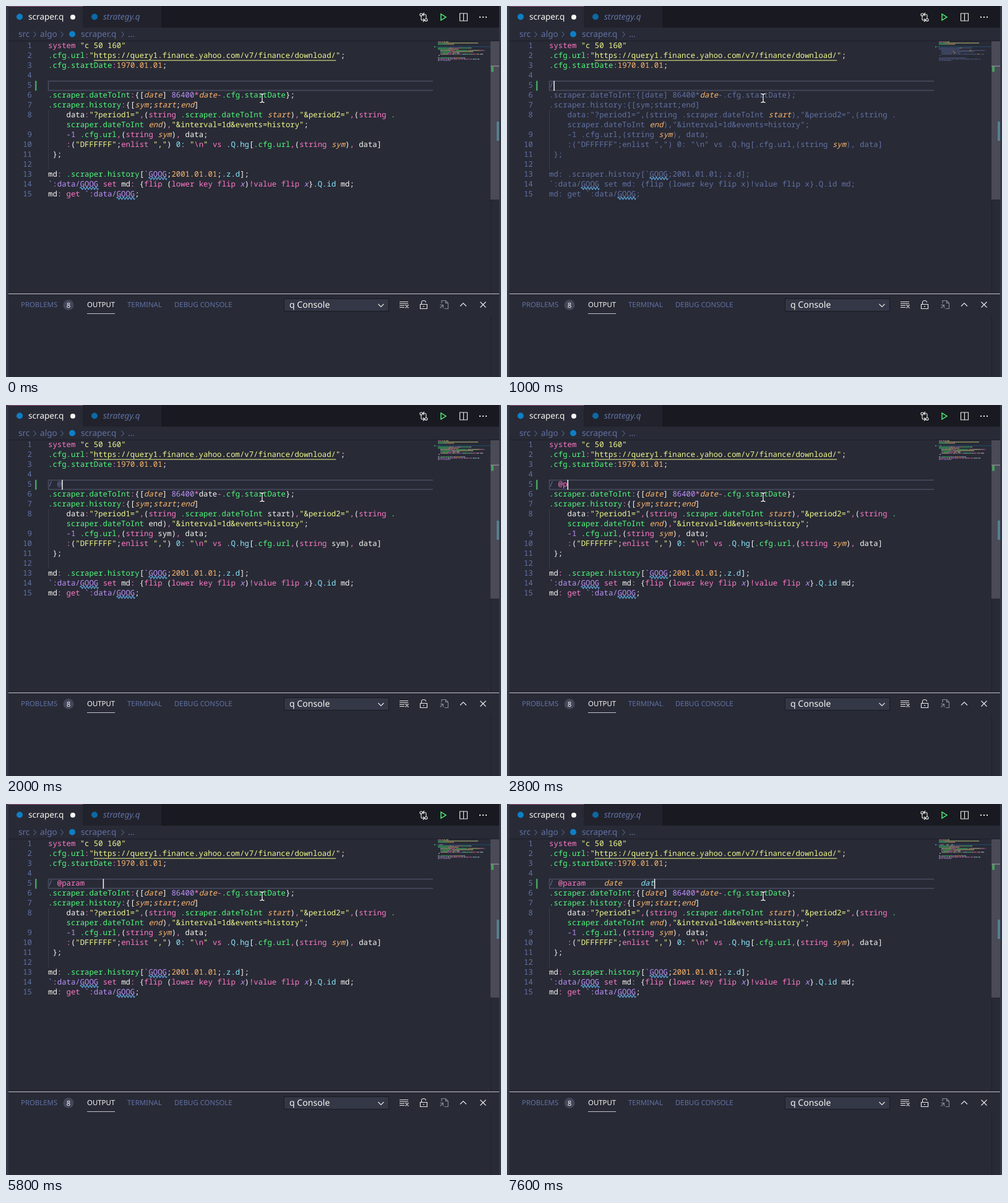
An HTML page for the animation above (8000 ms loop, 800 by 600 pixels).

```html
<!DOCTYPE html>
<html lang="en">
<head>
<meta charset="utf-8">
<title>Editor typing</title>
<style>
html, body { margin: 0; width: 100%; height: 100%; overflow: hidden; background: #282a36; }
svg { display: block; width: 800px; height: 600px; }
text { white-space: pre; text-rendering: geometricPrecision; fill: #f8f8f2; }
.ui text { font: 13.6px "Noto Sans", "Open Sans", sans-serif; }
.code text { font: 500 12.31px "Noto Sans Mono", "DejaVu Sans Mono", monospace; font-variant-ligatures: none; }
.ui .dim, .code .dim { fill: #6272a4; }
.code .dim { font-weight: 400; }
.ui .small { font-size: 11.4px; }
.ui .preview { font-style: italic; }
.icon { fill: none; stroke: #e8e8e6; stroke-width: 1.15; }
</style>
</head>
<body>
<svg viewBox="0 0 800 600">
  <defs>
    <path id="ibeam" d="M410.5 142q3 0 3.500 1.500q.5-1.500 3.500-1.500M414 143v12M410.500 156q3 0 3.500-1.500q.5 1.500 3.500 1.500" fill="none"/>
  </defs>
  <rect width="800" height="600" fill="#282a36"/>
  <g class="ui">
    <!-- tabs and breadcrumbs -->
    <rect width="800" height="35" fill="#191a21"/>
    <rect x="4" width="120.5" height="35" fill="#282a36"/>
    <rect x="4" width="120.5" height="1" fill="#94527e"/>
    <rect x="125" width="126" height="35" fill="#21222c"/>
    <circle cx="22" cy="17.5" r="5" fill="#0d7fc6"/>
    <text x="36" y="22">scraper.q</text>
    <circle cx="108" cy="18" r="4" fill="#f8f8f2"/>
    <circle cx="143" cy="17.5" r="5" fill="#0d69a3"/>
    <text x="157" y="22" class="dim preview">strategy.q</text>
    <text x="20" y="50" class="dim">src</text>
    <text x="55" y="50" class="dim">algo</text>
    <circle cx="107" cy="45.5" r="5" fill="#0d7fc6"/>
    <text x="121" y="50" class="dim">scraper.q</text>
    <text x="197" y="50" class="dim">…</text>
    <path d="M44.5 41.5l4 4.5-4 4.5M88.5 41.5l4 4.5-4 4.5M186.5 41.5l4 4.5-4 4.5" fill="none" stroke="#6272a4"/>
    <rect x="4" y="56" width="793" height="1" fill="#1d1e27"/>
    <g class="icon">
      <circle cx="671" cy="14" r="2"/><circle cx="679" cy="22.5" r="2"/>
      <path d="M671 16v5q0 2 2 2h3M674 20.5l2.5 2.5-2.5 2.5M679 20.5v-5q0-2-2-2h-3M676 11l-2.5 2.5 2.5 2.5"/>
      <path d="M703 13v10l8-5z" stroke="#50fa7b" stroke-width="1.4"/>
      <path d="M733.5 12h12v12h-12zM739.5 12v12"/>
      <path d="M765 18h2M770 18h2M775 18h2" stroke-width="2"/>
    </g>

    <!-- panel -->
    <rect x="4" y="465" width="793" height="1" fill="#c4c4c8"/>
    <text x="24" y="487" class="dim small">PROBLEMS</text>
    <circle cx="101" cy="483.5" r="8.5" fill="#44475a"/>
    <text x="101" y="487.5" class="small" text-anchor="middle">8</text>
    <text x="131" y="487" class="small">OUTPUT</text>
    <rect x="131" y="497" width="45" height="1" fill="#c4c4c8"/>
    <text x="196" y="487" class="dim small">TERMINAL</text>
    <text x="272" y="487" class="dim small">DEBUG CONSOLE</text>
    <rect x="449.5" y="473.5" width="169" height="20" fill="#343746" stroke="#191a21"/>
    <text x="458" y="488" style="font-size:14.1px">q Console</text>
    <g class="icon">
      <path d="M601.5 482l4.5 4.5 4.5-4.5"/>
      <path d="M636 478.5h14M636 481.5h14M636 484.5h8M636 487.5h8M645.5 483.5l5 5M650.5 483.5l-5 5"/>
      <path d="M669.5 482.5h11v7h-11zM671.5 482.5v-3q0-3 3.5-3t3.5 3M675 485v2"/>
      <path d="M704 481v-4.5h6.5l4 4v9h-6M710.5 476.5v4h4M701.5 483.5h5v5M706 484l-4.5 4.5" stroke="#8a8b92"/>
      <path d="M734 485.5l5-5 5 5M766.5 478.5l9 9M775.5 478.5l-9 9"/>
    </g>
    <rect x="783" y="501" width="1" height="99" fill="#20212b"/>
  </g>

  <!-- scrollbar and overview marks -->
  <rect x="783" y="57" width="1" height="408" fill="#20212b"/>
  <rect x="783" y="57" width="14" height="256" fill="#4a4b57"/>
  <rect x="783" y="96.5" width="14" height="1.5" fill="#85868c"/>
  <rect x="784" y="98" width="4" height="8.5" fill="#469d5e"/>
  <rect x="793" y="187" width="4" height="31" fill="#56808f"/>

  <!-- editor fixtures -->
  <path d="M690 121.500H68.500V136.500H690" fill="none" stroke="#4a4d61" stroke-width="1.5"/>
  <rect x="47" y="121" width="2.5" height="16" fill="#44a25d"/>
  <rect x="68" y="168" width="1" height="96" fill="#3a3c49"/>
  <rect x="692" y="65" width="91" height="1.5" fill="#20435c"/>
  <rect x="692" y="65" width="1.8" height="2" fill="#3f9858"/>
  <g class="code" id="numbers"></g>
  <g class="code" id="code"></g>
  <g id="map" opacity=".6"></g>
  <g id="marks" fill="none" stroke="#62aee8" stroke-width="1.2"></g>
  <rect x="141.8" y="87.5" width="391.5" height="1" fill="#f1fa8c"/>
  <rect id="caret" y="121" width="1.5" height="16" fill="#f8f8f2"/>
  <use href="#ibeam" stroke="#15161c" stroke-width="3"/>
  <use href="#ibeam" stroke="#fff" stroke-width="1.3"/>
  <rect width="4" height="600" fill="#343746"/>
  <rect x="797" width="3" height="600" fill="#343746"/>
</svg>
<script>
const X0 = 68, CHAR = 7.386, ROW = 16, LOOP = 8000;
const $ = id => document.getElementById(id);
const colX = col => X0 + col * CHAR;
const baseline = row => 68.3 + row * ROW;

// Each token starts with a letter that names its style.
const colors = {
  w: '#f8f8f2', p: '#ff79c6', g: '#50fa7b', y: '#f1fa8c', n: '#bd93f9',
  c: '#8be9fd', d: '#ffb86c', o: '#ffb86c', s: '#ffb86c', x: '#bd93f9',
  i: '#8be9fd', k: '#6272a4'
};
const italic = 'osxi';
const source = [
  'psystem|w |y"c 50 160"',
  'g.cfg.url|p:|y"https://query1.finance.yahoo.com/v7/finance/download/"|w;',
  'g.cfg.startDate|p:|d1970.01.01|w;',
  '',
  '',
  'g.scraper.dateToInt|p:|w{[|odate|w] |n86400|p*|sdate|p-|g.cfg.startDate|w};',
  'g.scraper.history|p:|w{[|osym|w;|ostart|w;|oend|w]',
  'w    data|p:|y"?period1="|p,|w(|pstring |g.scraper.dateToInt |sstart|w)|p,|y"&period2="|p,|w(|pstring |g.',
  'w    |gscraper.dateToInt |send|w)|p,|y"&interval=1d&events=history"|w;',
  'w    |n-1 |g.cfg.url|p,|w(|pstring |ssym|w)|p,|w data;',
  'w    |p:|w(|y"DFFFFFF"|w;|penlist |y","|w) |c0: |y"|p\\n|y" |pvs |c.Q.hg|w[|g.cfg.url|p,|w(|pstring |ssym|w)|p,|w data]',
  'w };',
  '',
  'wmd|p: |g.scraper.history|w[|n`GOOG|w;|d2001.01.01|w;|c.z.d|w];',
  'n`:data/GOOG |pset |wmd|p: |w{|pflip |w(|plower key flip |xx|w)|p!|pvalue flip |xx|w}|c.Q.id|w md;',
  'wmd|p: |pget |n`:data/GOOG|w;'
].map(line => line ? line.split('|').map(t => [t[0], t.slice(1)]) : []);

const typedTokens = n => {
  const parts = [['k', '/ '], [n > 3 ? 'p' : 'k', '@param    '], ['o', 'date    '], ['i', 'dat']];
  return parts.map(([kind, text]) => {
    const part = text.slice(0, Math.max(0, n));
    n -= text.length;
    return [kind, part];
  });
};

// [time, typed characters, caret shown, mode]
// Modes: 0 full colours, 1 comment with parameters, 2 comment, 3 no parameters.
const steps = [
  [0, 0, 0, 0], [200, 0, 1, 0], [700, 0, 0, 0], [1000, 1, 1, 1], [1300, 1, 1, 2],
  [1500, 1, 0, 2], [1700, 2, 1, 2], [2000, 3, 1, 3], [2300, 3, 1, 0], [2800, 4, 1, 0],
  [3200, 4, 0, 0], ...typing(3500, 5, 4), [4200, 9, 1, 0], [4700, 9, 0, 0],
  [5200, 9, 1, 0], [5700, 9, 0, 0], [5800, 12, 1, 0], ...typing(6300, 13, 4),
  [7000, 20, 1, 0], ...typing(7400, 21, 3)
];

function typing(time, typed, count) {
  return Array.from({ length: count }, (_, i) => [time + i * 100, typed + i, 1, 0]);
}

function styleOf(kind, row, mode) {
  if (row > 4 && mode) {
    if (kind === 's' && mode === 1) return 's';
    if (mode < 3) return 'k';
    if (kind === 's') return 'w';
  }
  return kind;
}

const escapeText = s => s.replace(/&/g, '&amp;').replace(/</g, '&lt;');

function drawCode(typed, mode) {
  let code = '', map = '';
  source.forEach((line, row) => {
    let col = 0;
    for (const [kind, text] of row === 4 ? typedTokens(typed) : line) {
      const style = styleOf(kind, row, mode), fill = colors[style];
      const slant = italic.includes(style) ? ';font-style:italic' : '';
      for (const word of text.matchAll(/\S+/g)) {
        const at = col + word.index;
        code += `<text x="${colX(at)}" y="${baseline(row)}" style="fill:${fill}${slant}">${escapeText(word[0])}</text>`;
        map += `<rect x="${698 + at}" y="${57.3 + row * 2}" width="${word[0].length}" height="1.2" fill="${fill}"/>`;
      }
      col += text.length;
    }
  });
  $('code').innerHTML = code;
  $('map').innerHTML = map;
}

function drawNumbers() {
  $('numbers').innerHTML = source.map((_, row) => row === 8 ? '' :
    `<text class="dim" x="42" y="${baseline(row)}" text-anchor="end">${row < 8 ? row + 1 : row}</text>`).join('');
}

function drawMarks() {
  const wave = 'q1.23 -4 2.46 0t2.46 0';
  $('marks').innerHTML = [[22, 13], [7, 14], [15, 15]].map(([col, row]) =>
    `<path d="M${colX(col)} ${baseline(row) + 2.5}${wave.repeat(6)}"/>`).join('');
}

let shown = null;
function frame(elapsed) {
  const time = elapsed % LOOP;
  const step = steps.findLast(s => s[0] <= time) || steps[0];
  if (step === shown) return;
  const [, typed, caretOn, mode] = step;
  drawCode(typed, mode);
  $('caret').setAttribute('x', colX(typed));
  $('caret').setAttribute('visibility', caretOn ? 'visible' : 'hidden');
  shown = step;
}

drawNumbers();
drawMarks();
const start = performance.now();
function tick() {
  frame(performance.now() - start);
  requestAnimationFrame(tick);
}
tick();
</script>
</body>
</html>
```
